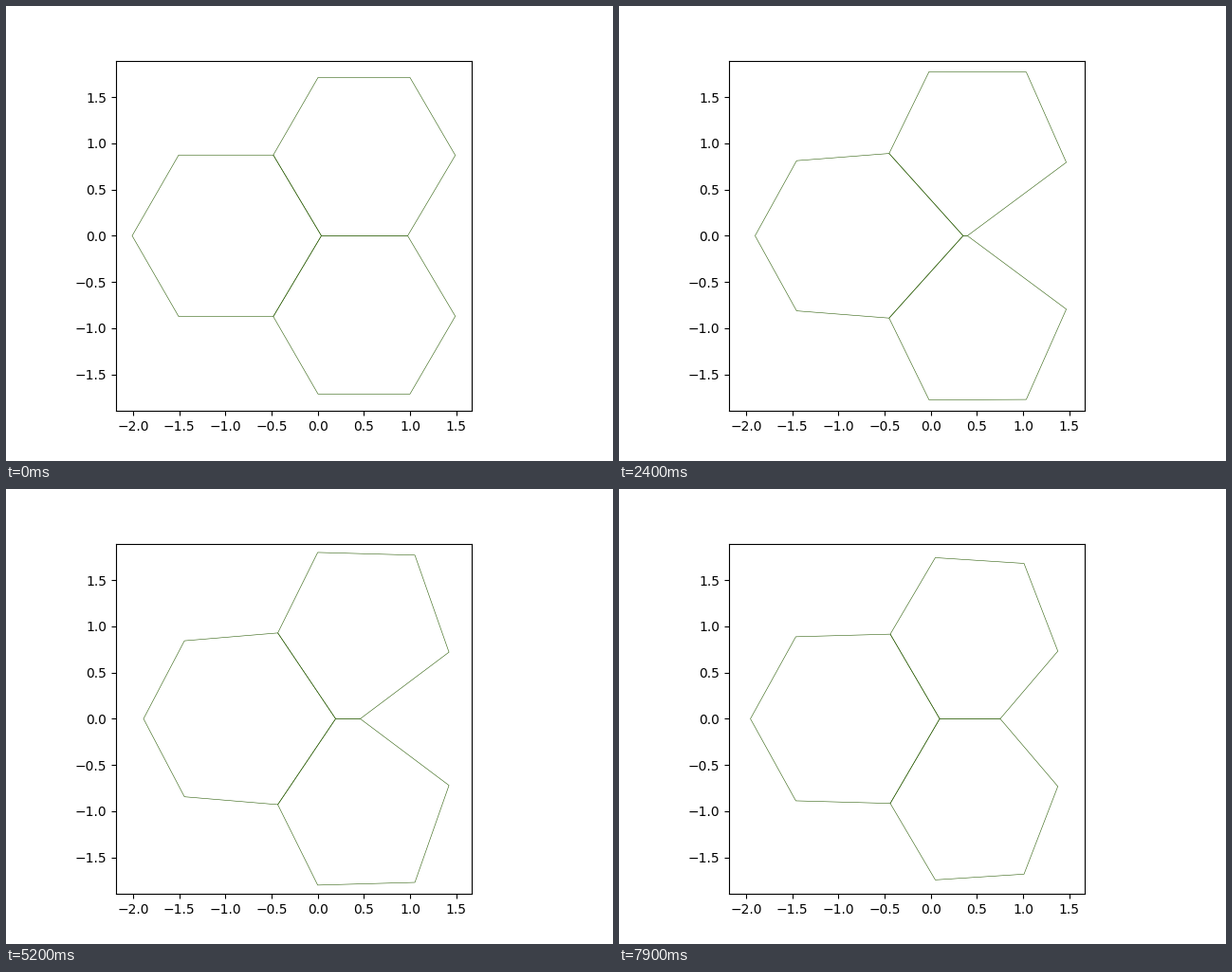
A matplotlib script that plays this animation: 640 by 480 pixels, repeating every 8000 ms.

```python
import numpy as np
import matplotlib.pyplot as plt
from matplotlib.animation import FuncAnimation

W, H, DPI = 640, 480, 100
FRAMES, STEP = 80, 100
SCALE, X0, Y0 = 97.45, 328.7, 242.4  # pixels per unit, pixel of the origin
TURN, END = 4.24, 7.9                # seconds: contraction ends, loop ends
GREEN = "#2a5c05"

# Points of the upper half as x + yj: rest, squeeze, relax, bow
CORNERS = np.array([
    (-2.008, 0.144, -0.087, 0.005),                               # left tip
    (0.506, -0.200, 0.118, 0.011),                                # short edge
    (-1.505 + 0.874j, 0.070 - 0.055j, -0.025 + 0.069j, 0.004 - 0.024j),
    (-0.481 + 0.874j, 0.048 + 0.048j, -0.005 - 0.006j, -0.004 - 0.019j),
    (0.003 + 1.713j, -0.021 + 0.099j, 0.067 - 0.068j, -0.007 - 0.008j),
    (0.998 + 1.713j, 0.060 + 0.083j, -0.049 - 0.114j, -0.008),
    (1.488 + 0.871j, -0.048 - 0.139j, -0.065, 0.014 + 0.025j),
])


def bump(u):
    return np.sin(np.pi * u ** 0.8)


def weights(t):
    """Shares of rest, squeeze, relax and bow at time t."""
    if t < TURN:
        squeeze = (1 - np.exp(-0.3 * t)) / (1 - np.exp(-0.3 * TURN))
        return 1, squeeze, 0, bump(t / TURN)
    u = (t - TURN) / (END - TURN)
    relax = (u + u * u * (3 - 2 * u)) / 2
    return 1, 1, relax, -0.5 * bump(min(u, 1))


def edge_length(t):
    """The shared edge shrinks, then grows back after the turn."""
    if t < TURN:
        return 0.934 * np.exp(-1.25 * t)
    return 0.872 * (1 - np.exp(-0.38 * (t - TURN)))


def cells(t):
    tip, mid, b, c, e, f, g = CORNERS @ np.array(weights(t))
    half = edge_length(t) / 2
    inner, outer = mid - half, mid + half
    left = np.array([tip, b, c, inner, c.conj(), b.conj()])
    upper = np.array([inner, c, e, f, g, outer])
    return [np.column_stack([p.real, p.imag])
            for p in (left, upper, upper.conj())]


fig = plt.figure(figsize=(W / DPI, H / DPI), dpi=DPI)
x1, x2, y1, y2 = 115.9, 491.2, 57.6, 427.2
ax = fig.add_axes([x1 / W, 1 - y2 / H, (x2 - x1) / W, (y2 - y1) / H])
ax.set_xlim((x1 - X0) / SCALE, (x2 - X0) / SCALE)
ax.set_ylim((Y0 - y2) / SCALE, (Y0 - y1) / SCALE)

outlines = [ax.add_patch(plt.Polygon(c, fill=False, ec=GREEN, lw=0.4))
            for c in cells(0)]


def update(n):
    for outline, corners in zip(outlines, cells(n * STEP / 1000)):
        outline.set_xy(corners)
    return outlines


anim = FuncAnimation(fig, update, frames=FRAMES, interval=STEP,
                     repeat=True, repeat_delay=0)
plt.show()
```
